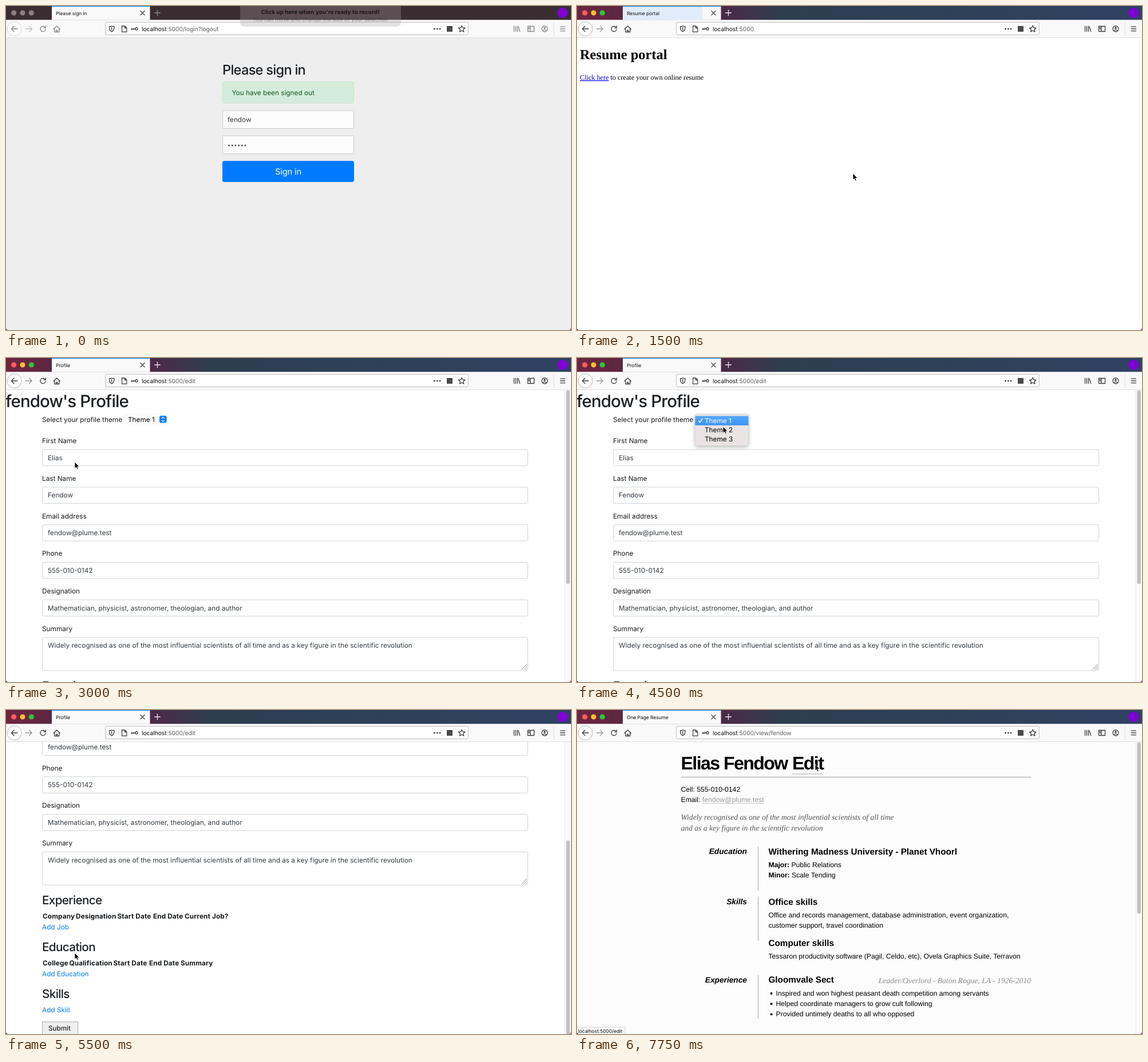
Animation, 987 px wide and 567 px high, one loop 8000 ms. Source, as an HTML page:

```html
<!DOCTYPE html>
<html lang="en">
<head>
<meta charset="utf-8">
<title>Resume portal</title>
<style>
html, body { margin: 0; width: 100%; height: 100%; overflow: hidden; background: #fff; }
svg { display: block; width: 987px; height: 567px; }
text { font-family: Inter, sans-serif; font-optical-sizing: none; text-rendering: geometricPrecision; white-space: pre; }
.ui, .val, .link, .th { font-size: 11.8px; }
.ui { fill: #16191c; }
.val { fill: #363c42; }
.link { fill: #007bff; }
.th { letter-spacing: .01em; font-weight: 700; fill: #16191c; }
.h1 { font-size: 29.5px; }
.h2 { font-size: 23.6px; }
.h3 { font-size: 20.7px; }
.h1, .h2, .h3 { font-weight: 500; letter-spacing: -.031em; fill: #1c2024; }
.small { font-size: 8.4px; fill: #0c0c0d; }
.url { font-size: 10.3px; letter-spacing: -.005em; fill: #0c0c0d; }
.serif { font: 12.2px "Liberation Serif", serif; }
.sans { font: 12.2px "Liberation Sans", sans-serif; }
.b { font-weight: 700; }
.sub { font-size: 15.26px; font-weight: 700; }
.side { font: italic 700 13.73px "Liberation Sans", sans-serif; text-anchor: end; }
.name { font: 700 32px "Liberation Sans", sans-serif; letter-spacing: -1.526px; }
.quote { font: italic 13.6px "Liberation Serif", serif; fill: #555; }
.line { fill: none; stroke: #3e3e42; stroke-width: 1.3; stroke-linecap: round; stroke-linejoin: round; }
</style>
</head>
<body>
<svg id="stage" viewBox="0 0 987 567" xmlns="http://www.w3.org/2000/svg"></svg>
<script>
const stage = document.getElementById('stage');
const STEP = 250, LOOP = 8000, SCROLL = 240.7;

const user = 'fendow', first = 'Elias', last = 'Fendow';
const mail = 'fendow@plume.test', phone = '555-010-0142';
const summary = ['Widely recognised as one of the most influential scientists of all time',
  'and as a key figure in the scientific revolution'];

const text = (x, y, s, cls, more = '') => `<text x="${x}" y="${y}" class="${cls}" ${more}>${s}</text>`;
const rect = (x, y, w, h, fill, more = '') =>
  `<rect x="${x}" y="${y}" width="${w}" height="${h}" fill="${fill}" ${more}/>`;
const box = (x, y, w, h, fill, stroke, r = 3) =>
  rect(x + .5, y + .5, w - 1, h - 1, fill, `stroke="${stroke}" rx="${r}"`);
const dot = (x, y, r, fill, more = '') => `<circle cx="${x}" cy="${y}" r="${r}" fill="${fill}" ${more}/>`;
const line = (d, more = '') => `<path class="line" d="${d}" ${more}/>`;
const group = (id, body, more = '') => `<g id="${id}" ${more}>${body}</g>`;
const range = n => [...Array(n).keys()];

function loginPage() {
  return rect(0, 55, 987, 512, '#eee')
    + text(378, 120, 'Please sign in', 'h2')
    + box(378, 132, 230, 38.5, '#d4edda', '#c3e6cb')
    + text(394.5, 156, 'You have been signed out', 'ui', 'style="fill:#155724"')
    + box(378, 182.5, 230, 32.5, '#fcfcfc', '#c9cacc', 2)
    + text(387, 203, user, 'val')
    + box(378, 226.5, 230, 32.5, '#fcfcfc', '#c9cacc', 2)
    + range(6).map(i => dot(389.5 + i * 5.7, 244, 1.5, '#495057')).join('')
    + '<rect id="signin" x="378" y="271" width="230" height="37" rx="3.5"/>'
    + text(493, 295, 'Sign in', 'ui', 'text-anchor="middle" style="font-size:14.8px;letter-spacing:-.014em;fill:#fff"');
}

function homePage() {
  return rect(0, 55, 987, 512, '#fff')
    + text(5, 93, 'Resume portal', 'serif', 'style="font-size:24.4px;font-weight:700"')
    + text(5, 129, '<tspan fill="#00e" text-decoration="underline">Click here</tspan> to create your own online resume', 'serif');
}

function select() {
  return rect(208, 99.5, 74, 16, '#fff', 'rx="3" stroke="#eee"')
    + '<text id="theme" x="213" y="112" class="ui" style="fill:#000"></text>'
    + rect(268, 101, 12.6, 12.6, '#0a7bff', 'rx="3"')
    + '<path d="M272 105.8l2.3-2.3 2.3 2.3M272 108.8l2.3 2.3 2.3-2.3" fill="none" stroke="#fff" stroke-width="1.2"/>';
}

function menu() {
  return rect(206, 98.5, 93.5, 55, '#ebe4e5', 'rx="4" stroke="#c9c4c6" stroke-width=".6" filter="url(#shadow)"')
    + rect(206.3, 101.5, 93, 16.3, 'url(#pick)')
    + [1, 2, 3].map(i => text(223, 97.7 + i * 16.1, 'Theme ' + i, 'ui', `style="fill:${i == 1 ? '#fff' : '#000'}"`)).join('')
    + '<path d="M212.5 109.5l2.4 3.3 4.4-7.2" fill="none" stroke="#fff" stroke-width="1.4"/>';
}

function editPage() {
  const fields = [['First Name', first], ['Last Name', last], ['Email address', mail], ['Phone', phone],
    ['Designation', 'Mathematician, physicist, astronomer, theologian, and author'], ['Summary', summary.join(' ')]];
  const rows = fields.map(([label, value], i) => {
    const y = 159.7 + i * 65.75;
    return text(63, y - 10.6, label, 'ui')
      + box(63, y, 849, i == 5 ? 59 : 29.5, '#fff', '#ced4da')
      + text(73, y + 19, value, 'val');
  }).join('');
  const heads = (y, xs, names) => names.map((s, i) => text(xs[i], y, s, 'th')).join('');
  return text(-1, 85.5, user + "'s Profile", 'h1')
    + text(63, 112, 'Select your profile theme', 'ui') + select() + rows
    + '<path d="M901 545l9-9M904.5 545.5l5.5-5.5M908 545.5l2-2" stroke="#666" stroke-width=".8"/>'
    + text(63, 580.5, 'Experience', 'h3')
    + heads(605.5, [64, 122, 194.5, 257, 312], ['Company', 'Designation', 'Start Date', 'End Date', 'Current Job?'])
    + text(63, 624.7, 'Add Job', 'link')
    + text(63, 662.7, 'Education', 'h3')
    + heads(687.7, [64, 110.5, 187.5, 250, 305], ['College', 'Qualification', 'Start Date', 'End Date', 'Summary'])
    + text(63, 706.7, 'Add Education', 'link')
    + text(63, 745, 'Skills', 'h3')
    + text(63, 769.3, 'Add Skill', 'link')
    + box(63, 786, 63, 30, '#efefef', '#aaa', 0)
    + text(74, 801.7, 'Submit', 'ui', 'style="fill:#000"');
}

function viewPage() {
  const side = (y, h, s) => text(297, y + 13, s, 'side') + rect(316, y, 1, h, '#a5a5a5');
  const sub = (y, s) => text(334.5, y, s, 'sans sub');
  const para = (y, s, x = 334.5) => text(x, y, s, 'sans');
  const jobs = ['Inspired and won highest peasant death competition among servants',
    'Helped coordinate managers to grow cult following', 'Provided untimely deaths to all who opposed'];
  return rect(0, 55, 987, 512, '#fcfcfc')
    + text(181.5, 104, first + ' ' + last, 'name') + text(376, 104, 'Edit', 'name')
    + rect(376, 111.5, 54, 1, '#aaa') + rect(182, 117, 611, 1, '#999')
    + para(142.5, 'Cell: ' + phone, 181.5)
    + para(161, `Email: <tspan fill="#999">${mail}</tspan>`, 181.5) + rect(219, 163, 108, .8, '#bbb')
    + text(181.5, 192, summary[0], 'quote') + text(181.5, 210.5, summary[1], 'quote')
    + side(239, 77, 'Education') + sub(252.5, 'Withering Madness University - Planet Vhoorl')
    + para(275, '<tspan class="b">Major:</tspan> Public Relations')
    + para(293, '<tspan class="b">Minor:</tspan> Scale Tending')
    + side(327, 77, 'Skills') + sub(340.5, 'Office skills')
    + para(363, 'Office and records management, database administration, event organization,')
    + para(381, 'customer support, travel coordination')
    + sub(412.5, 'Computer skills')
    + para(434.5, 'Tessaron productivity software (Pagil, Celdo, etc), Ovela Graphics Suite, Terravon')
    + side(464, 76, 'Experience') + sub(477, 'Gloomvale Sect')
    + text(793, 477.5, 'Leader/Overlord - Baton Rogue, LA - 1926-2010', 'quote', 'text-anchor="end" style="fill:#8c8c8c"')
    + jobs.map((s, i) => dot(339.5, 496 + i * 18.3, 2, '#000') + para(499.7 + i * 18.3, s, 347.5)).join('');
}

function chrome() {
  const tabBar = group('live', rect(0, 0, 987, 24.5, 'url(#bar)')) + group('dull', rect(0, 0, 987, 24.5, '#3a2d32'));
  const lights = group('lights', range(3).map(i => dot(13.7 + i * 15.3, 12, 4.6, '#8b8184')).join(''));
  const tab = rect(80, 0, 171.5, 24.5, '#f9f9fa') + '<rect id="burst" x="80" y="1" width="139" height="23.5" fill="#e0ecfa"/>'
    + rect(80, 0, 171.5, 1.2, '#0a84ff') + dot(88.5, 12.2, 1.5, '#444', 'id="spin"')
    + '<text id="title" y="15.5" class="small"></text>'
    + line('M235 8.8l7 7M242 8.8l-7 7') + line('M259.5 12h10M264.5 7v10', 'id="plus"');
  const bar = rect(0, 24.5, 987, 31, '#f9f9fa') + rect(0, 55, 987, 1, '#dfdfe1');
  const nav = group('nav',
    dot(14.5, 40, 12.5, '#fff', 'stroke="#b8b8ba"')
    + line('M20 40H9.5M14 35.3L9.3 40l4.7 4.7', 'stroke-width="1.6"')
    + line('M34.5 40h10.5M40.5 35.3l4.7 4.7-4.7 4.7', 'opacity=".5"')
    + line('M68.3 37.5A4.6 4.6 0 1 0 69 41M69.3 35v3.3h-3.3')
    + line('M83 40.5L88.7 35l5.7 5.5M84.7 39.5v6h8v-6M87.7 45.3v-3h2v3'));
  const url = box(173, 28, 635, 23, '#fff', '#bdbdc0', 2.5)
    + line('M180.5 36q2.5 0 4.2-1.2Q186.5 36 189 36q.4 6.5-4.3 9Q180 42.5 180.5 36zM184.7 37.3v5')
    + rect(196, 32, 1, 15, '#ddd')
    + line('M202.5 35h5l3.3 3.3v7h-8.3zM207.3 35v3.5h3.5')
    + line('M226 40a2 2 0 1 0 4 0a2 2 0 1 0-4 0H219v1.5M222 40v1.5')
    + '<text id="url" x="237" y="44" class="url">localhost<tspan fill="#5f5f63"></tspan></text>'
    + [748.5, 753.3, 758].map(x => dot(x, 40, 1.5, '#4a4a4f')).join('')
    + rect(770, 35, 10, 10, '#4a4a4f')
    + line('M796.2 34.3l1.7 3.7 4 .4-3 2.7.9 4-3.6-2.1-3.6 2.1.9-4-3-2.7 4-.4z');
  const tools = group('tools',
    line('M887.5 35.5v9M890.5 35.5v9M893.5 35.5v9M895 36l2.7 8.5')
    + line('M911.5 35.5h11v9h-11zM916 35.5v9M913 38h1.5M913 40h1.5')
    + dot(941, 40, 5, 'none', 'class="line"') + dot(941, 38.5, 1.8, '#3e3e42')
    + line('M938 43.3q3-3.3 6 0')
    + line('M968.5 36.3h8M968.5 40h8M968.5 43.7h8'));
  return tabBar + lights + tab + bar + nav + url + tools
    + rect(956.5, 28, 1, 24, '#dedee0') + dot(972, 12, 9, '#8000d7');
}

function prompt() {
  return '<path d="M409 0H690V28q0 8-8 8H417q-8 0-8-8z" fill="#a5a0a0" opacity=".3"/>'
    + text(549, 13.7, "Click up here when you're ready to record!", 'small', 'text-anchor="middle" style="font-size:10px;font-weight:700;fill:#1d1719"')
    + text(549, 27, 'You can move and change the size of your selection', 'small', 'text-anchor="middle" clip-path="url(#cut)" style="font-size:9.57px;fill:#2c2226;opacity:.4"');
}

stage.innerHTML = `<defs>
  <linearGradient id="bar"><stop stop-color="#6e2540"/><stop offset=".08" stop-color="#5c2742"/>
    <stop offset=".27" stop-color="#4a2b47"/><stop offset=".36" stop-color="#2f3d50"/>
    <stop offset=".7" stop-color="#2c4259"/><stop offset="1" stop-color="#2f4163"/></linearGradient>
  <linearGradient id="pick" x2="0" y2="1"><stop stop-color="#55a8fb"/><stop offset="1" stop-color="#3b92f5"/></linearGradient>
  <filter id="shadow" x="-20%" y="-20%" width="140%" height="150%"><feDropShadow dx="0" dy="2" stdDeviation="3" flood-opacity=".28"/></filter>
  <clipPath id="cut"><rect x="409" y="0" width="281" height="28"/></clipPath></defs>`
  + group('login', loginPage()) + group('home', homePage())
  + group('edit', rect(0, 55, 987, 512, '#fff') + group('form', editPage()) + group('menu', menu()))
  + group('view', viewPage())
  + group('bars', rect(976, 56, 11, 511, '#fafafa') + rect(975.5, 56, 1, 511, '#e8e8e8')
    + '<rect id="thumb" x="978.5" width="6.5" rx="3.2" fill="#c1c1c1"/>')
  + chrome() + group('prompt', prompt())
  + group('status', '<rect id="plate" x="-1" y="555" height="14" fill="#f9f9fa" stroke="#d4d4d6"/><text id="hint" x="2" y="565" class="small"></text>')
  + '<path d="M0 563q0 4 4 4H0z" fill="#1c1a22"/><path d="M987 562q0 5-4 5h4z" fill="#b3154e"/>'
  + '<path id="arrow" d="M0 0V11.3L2.6 8.9 4.3 12.8 6.2 12 4.5 8.2H8z" fill="#000" stroke="#fff" stroke-width=".8"/>';

const el = {};
stage.querySelectorAll('[id]').forEach(n => el[n.id] = n);
const show = (id, on) => el[id].style.display = on ? '' : 'none';
const set = (id, attrs) => { for (const k in attrs) el[id].setAttribute(k, attrs[k]); };

// Pointer path: step, x, y
const path = [[1, 545, 45], [3, 482, 293], [6, 482, 293], [9, 32, 121], [10, 32, 121], [12, 120, 182],
  [15, 248, 104], [17, 255, 105], [18, 255, 120], [19, 250, 128], [20, 188, 275], [21, 125, 400],
  [22, 120, 425], [24, 92, 552], [26, 92, 552], [29, 330, 190], [30, 395, 125], [31, 416, 95]];

function pointer(k) {
  const i = Math.max(1, path.findIndex(p => p[0] >= k));
  const [a, ax, ay] = path[i - 1], [b, bx, by] = path[i];
  const u = Math.max(0, (k - a) / (b - a)), e = u * u * (3 - 2 * u);
  return [ax + (bx - ax) * e, ay + (by - ay) * e];
}

const pages = {
  login: ['Please sign in', ':5000/login?logout'],
  home: ['Resume portal', ':5000'],
  edit: ['Profile', ':5000/edit'],
  view: ['One Page Resume', ':5000/view/' + user]
};

function draw(ms) {
  const k = Math.floor(ms % LOOP / STEP);
  const page = k < 6 ? 'login' : k < 10 ? 'home' : k < 26 ? 'edit' : 'view';
  const active = k >= 3, loading = k == 5;
  for (const p in pages) show(p, p == page);

  el.title.textContent = pages[page][0];
  set('title', { x: loading ? 104 : 87 });
  el.url.lastChild.textContent = pages[page][1];
  show('spin', loading);
  show('burst', k == 6 || k == 10 || k == 26);
  show('prompt', k == 0);
  show('live', active);
  show('dull', !active);
  ['#ff5f57', '#febc2e', '#28c840'].forEach((c, i) => el.lights.children[i].setAttribute('fill', active ? c : '#8b8184'));
  set('nav', { opacity: active ? 1 : .6 });
  set('tools', { opacity: active ? 1 : .6 });
  el.plus.style.stroke = active ? '#e6e2e8' : '#8f8688';
  set('signin', { fill: active ? '#0069d9' : '#007bff' });

  const scroll = page != 'edit' || k < 21 ? 0 : k < 22 ? 130 : SCROLL;
  set('form', { transform: `translate(0 ${-scroll})` });
  el.theme.textContent = k < 19 ? 'Theme 1' : 'Theme 2';
  show('menu', k >= 16 && k < 19);
  show('bars', page == 'edit' || page == 'view');
  set('thumb', { y: 56.5 + scroll / SCROLL * 172, height: page == 'view' ? 300 : 339 });

  const link = k == 9 || k == 10 || k == 31;
  show('status', loading || link);
  set('plate', { width: loading ? 185 : 85 });
  el.hint.textContent = loading ? 'localhost' : 'localhost:5000/edit';

  show('arrow', k > 0);
  const [x, y] = pointer(k);
  set('arrow', { transform: `translate(${x} ${y})` });
}

const start = performance.now();
function tick() {
  draw(performance.now() - start);
  requestAnimationFrame(tick);
}
tick();
</script>
</body>
</html>
```
